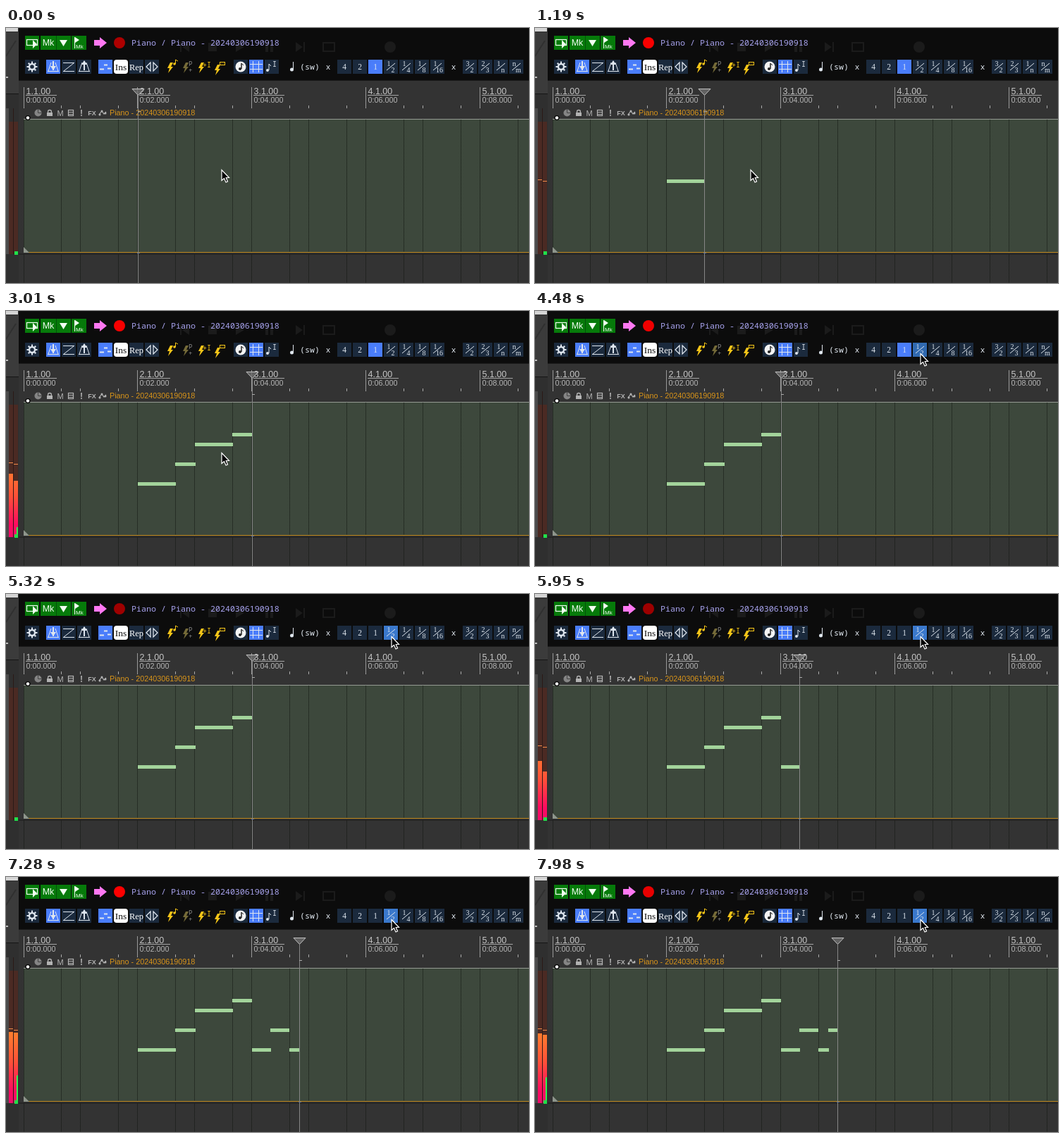
These frames come from a looping animation (742 px wide and 362 px high, 8 s). An HTML page with a canvas:

```html
<!DOCTYPE html>
<html>
<head>
<meta charset="utf-8">
<style>
html, body { margin: 0; width: 100%; height: 100%; overflow: hidden; background: #0c0c0c; }
canvas { display: block; }
</style>
</head>
<body>
<canvas id="stage" width="742" height="362"></canvas>
<script>
const c = document.getElementById('stage').getContext('2d');
const LOOP = 8000, STEP = 70, CLICK = 4900;
const SANS = '"Liberation Sans", sans-serif', MONO = '"Noto Sans Mono", monospace', SERIF = '"Liberation Serif", serif';
const NAVY = '#1b2a3d', BLUE = '#4a7dfb', PALE = '#dfe6ee', GOLD = '#f5c518';

// start x, end x, semitone, time of key press
const notes = [
  [187, 241, 0, 700], [240, 269, 2, 1540], [268, 322, 4, 2240], [321, 349, 5, 2850],
  [349, 376, 0, 5740], [375, 402, 2, 6450], [402, 417, 0, 7210], [416, 429, 2, 7900]
];

function rect(x, y, w, h, fill) { c.fillStyle = fill; c.fillRect(x, y, w, h); }

function path(pts, close) {
  c.beginPath();
  for (let i = 0; i < pts.length; i += 2) c.lineTo(pts[i], pts[i + 1]);
  if (close) c.closePath();
}
function line(pts, color, w = 1) {
  path(pts);
  c.strokeStyle = color; c.lineWidth = w; c.stroke();
}
function poly(pts, fill, edge, w = 1) {
  path(pts, true);
  if (fill) { c.fillStyle = fill; c.fill(); }
  if (edge) { c.strokeStyle = edge; c.lineWidth = w; c.stroke(); }
}
function disc(x, y, r, fill) {
  c.beginPath(); c.arc(x, y, r, 0, 7);
  c.fillStyle = fill; c.fill();
}
function ring(x, y, r, color, w = 1) {
  c.beginPath(); c.arc(x, y, r, 0, 7);
  c.strokeStyle = color; c.lineWidth = w; c.stroke();
}
function text(s, x, y, font, color, align = 'left') {
  c.font = font; c.fillStyle = color; c.textAlign = align;
  c.fillText(s, x, y);
}
function button(x, fill = NAVY, y = 45) { rect(x, y, 20, 20, fill); }

function fraction(x, a, b, fill) {
  button(x, fill);
  text(a, x + 7, 54, '10px ' + SERIF, PALE, 'center');
  text(b, x + 13, 63, '10px ' + SERIF, PALE, 'center');
  line([x + 4, 60, x + 16, 50], PALE);
}

function bolt(x, y, color) {
  poly([x + 4, y, x, y + 8, x + 3, y + 8, x + 1, y + 15, x + 8, y + 6, x + 5, y + 6, x + 8, y], color);
}

function ghosts() {
  const g = '#1b1b1b';
  rect(247, 20, 2, 14, g); poly([260, 20, 250, 27, 260, 34], g);
  rect(287, 21, 12, 12, g);
  poly([326, 20, 338, 27, 326, 34], g);
  rect(368, 20, 4, 14, g); rect(375, 20, 4, 14, g);
  poly([411, 20, 421, 27, 411, 34], g); rect(422, 20, 2, 14, g);
  c.strokeStyle = g; c.lineWidth = 2; c.strokeRect(450, 21, 16, 12);
  disc(545, 27, 8, g);
}

function titleRow(t) {
  const green = '#067a0a', w = '#f2fff2';
  button(27, green, 11); rect(49, 11, 43, 20, green); rect(93, 11, 21, 20, green);
  rect(71, 11, 1, 20, '#04500a');
  c.strokeStyle = w; c.lineWidth = 1.2; c.strokeRect(29.5, 16.5, 15, 8);
  poly([38, 17, 44, 23, 38, 29], w);
  text('Mk', 60, 25, '12.5px ' + SANS, w, 'center');
  poly([76, 17, 87, 17, 81.5, 26], w);
  line([97.5, 13, 97.5, 29], w); poly([98, 13, 104, 17, 98, 21], w);
  text('Mk', 99, 29, '8px ' + SANS, w);
  poly([125, 17, 133, 17, 133, 13, 143, 21, 133, 29, 133, 25, 125, 25], '#ff78f2');
  const pulse = Math.cos((t - 175) / 550 * 2 * Math.PI) * 1.6;
  disc(161, 21, 8, `rgb(${205 + 48 * Math.max(-1, Math.min(1, pulse))},0,0)`);
  text('Piano / Piano - 20240306190918', 178, 25, '11.67px ' + MONO, '#a8a3ee');
}

function toolRow(t) {
  button(27);
  ring(37, 55, 4, PALE, 2.4);
  for (let a = 0; a < 8; a++) {
    const dx = Math.cos(a * Math.PI / 4), dy = Math.sin(a * Math.PI / 4);
    line([37 + dx * 5, 55 + dy * 5, 37 + dx * 7.5, 55 + dy * 7.5], PALE, 2);
  }
  [57, 79, 101].forEach((x, i) => {
    button(x, i ? NAVY : BLUE);
    if (i == 1) {
      line([81, 49.5, 97, 49.5], PALE); line([81, 61.5, 97, 61.5], PALE); line([82, 61, 96, 50], PALE);
    } else {
      line([x + 2, 61.5, x + 18, 61.5], PALE);
      line([x + 7, 49, x + 3, 61], PALE); line([x + 13, 49, x + 17, 61], PALE);
      line([x + 10, 47, x + 10, 60], PALE, 2);
      poly(i ? [x + 6, 52, x + 10, 46, x + 14, 52] : [x + 6, 54, x + 10, 60, x + 14, 54], PALE);
    }
  });
  button(131, BLUE);
  line([133, 58.5, 139, 58.5], PALE, 2); line([139, 52.5, 144, 52.5], PALE, 2); line([144, 57.5, 149, 57.5], PALE, 2);
  c.fillStyle = '#fff'; c.beginPath(); c.roundRect(153, 45, 20, 20, 4); c.fill();
  text('Ins', 163, 60, '13.5px ' + SERIF, '#111', 'center');
  button(175);
  text('Rep', 185, 60, '12.5px ' + SERIF, '#fff', 'center');
  button(197);
  poly([205, 49, 199, 55, 205, 61], null, PALE, 1.3);
  poly([209, 49, 215, 55, 209, 61], null, PALE, 1.3);

  bolt(229, 49, GOLD);
  disc(239, 51, 1.8, GOLD); line([240.5, 51, 240.5, 45, 244, 47], GOLD);
  bolt(251, 49, '#746a38'); text('P', 259, 54, '9px ' + MONO, '#8a8a8a'); text('+', 259, 63, '9px ' + MONO, '#8a8a8a');
  bolt(273, 49, GOLD); text('+I', 279, 56, '10px ' + MONO, GOLD);
  bolt(296, 52, GOLD); c.strokeStyle = GOLD; c.lineWidth = 1; c.strokeRect(303.5, 48.5, 7, 4);

  button(323);
  disc(333, 55, 7.5, '#f4f4f4');
  line([334, 50, 334, 58], '#222', 1.5); disc(332, 58, 2, '#222'); line([334, 50, 337, 53], '#222');
  button(345, BLUE);
  line([346, 51.5, 364, 51.5], PALE); line([346, 58.5, 364, 58.5], PALE);
  line([350.5, 47, 350.5, 63], PALE); line([358.5, 47, 358.5, 63], PALE);
  button(367);
  disc(371, 60, 2, PALE); line([373, 60, 373, 51, 376, 54], PALE); text('I', 378, 55, '10px ' + MONO, PALE);

  disc(405.5, 59, 2.5, PALE); line([407.5, 59, 407.5, 48], PALE);
  text('(sw)', 417, 59, '11.67px ' + MONO, PALE);
  text('x', 457, 59, '11px ' + MONO, PALE, 'center');
  text('x', 635, 59, '11px ' + MONO, PALE, 'center');
  const clicked = t >= CLICK;
  ['4', '2', '1'].forEach((s, i) => {
    button(470 + i * 22, i == 2 && !clicked ? BLUE : NAVY);
    text(s, 480 + i * 22, 59, '11.5px ' + SERIF, PALE, 'center');
  });
  fraction(536, '1', '2', clicked ? '#3a78cc' : t >= 4270 ? '#3069b0' : NAVY);
  fraction(558, '1', '4'); fraction(580, '1', '8'); fraction(602, '1', '16');
  fraction(648, '3', '2'); fraction(670, '2', '3'); fraction(692, '1', 'n'); fraction(714, 'n', 'm');
}

function arrange() {
  rect(18, 75, 724, 287, '#333');
  rect(18, 74, 724, 1, '#1a1a1a');
  rect(25, 130, 717, 189, '#3d483c');
  for (let k = 0; k < 9; k++) {
    for (const dx of [0, 53.9]) {
      const x = Math.floor(25 + k * 80.9 + dx);
      c.setLineDash([1, 1]);
      line([x + .5, 130, x + .5, 362], '#10140f');
      c.setLineDash([]);
      rect(x, 110, 1, 4, '#aaa');
    }
  }
  for (let bar = 0; bar < 5; bar++) {
    const x = Math.floor(25 + bar * 161.8);
    rect(x, 84, 1, 29, '#999');
    text(`${bar + 1}.1.00`, x + 3.5, 94, '12.5px ' + SANS, '#c4c4c4');
    rect(x + 3, 95, 44, 1, '#a5a5a5');
    text(`0:0${bar * 2}.000`, x + 3.5, 106, '10.8px ' + SANS, '#b4b4b4');
  }
  rect(25, 129, 717, 1, '#959b93');
  rect(25, 318, 717, 1, '#bd871c');
  rect(18, 320, 724, 2, '#262626');
  poly([25, 311, 33, 319, 25, 319], '#8f968c');
}

function itemLabel() {
  const g = '#b3b3b3';
  disc(45.5, 120.5, 5, '#858585'); line([45.5, 115.5, 45.5, 120.5, 50, 120.5], '#444');
  rect(58, 120, 8, 5, g); ring(62, 119, 2.5, g, 1.3);
  text('M', 77, 124.5, '11px ' + SANS, g, 'center');
  c.strokeStyle = g; c.lineWidth = 1.2; c.strokeRect(88.5, 116.5, 7, 8);
  line([88, 119.5, 96, 119.5], g); line([88, 122.5, 96, 122.5], g);
  text('!', 107, 125, 'bold 12px ' + SANS, g, 'center');
  text('FX', 122, 124, 'bold 9px ' + SANS, g, 'center');
  line([132, 123, 136, 118, 139, 122, 142, 119], g, 1.2);
  disc(133, 123, 1.5, g); disc(136, 118, 1.5, g); disc(141, 121, 1.5, g);
  text('Piano - 20240306190918', 147, 124, '10.8px ' + SANS, '#d8941a');
  disc(31, 127.5, 3.5, '#000'); disc(31, 127.5, 2.3, '#fff');
}

function meters(age) {
  rect(0, 0, 18, 362, '#2f2f2f');
  rect(0, 6, 18, 88, '#3b3b3b');
  rect(0, 0, 17, 5, '#d4d4d4');
  line([0, 40, 14, 18], '#303030', 2);
  rect(0, 69, 3, 2, '#bbb');
  rect(0, 93, 18, 1, '#151515');
  rect(0, 114, 4, 207, '#4b4b4b');
  rect(4, 133, 6, 188, '#4b2a23'); rect(11, 133, 6, 188, '#4b2a23');
  rect(10, 114, 1, 207, '#2a1a17');
  if (age < 570) {
    const fall = Math.max(0, age - 260) * .9;
    const glow = c.createLinearGradient(0, 205, 0, 321);
    glow.addColorStop(0, '#ff8f2a'); glow.addColorStop(.5, '#ff5038'); glow.addColorStop(.85, '#ff0a60'); glow.addColorStop(1, '#f00a6a');
    [[4, 212, .12, 215], [11, 206, .22, 217]].forEach(([x, top, rate, peak]) => {
      const y = Math.min(321, Math.round(top + age * rate + fall));
      rect(x, y, 6, 321 - y, glow);
      rect(x, peak, 6, 1, '#f08a4a');
    });
    const y = Math.min(317, 262 + age * .28);
    rect(15, y, 2, 321 - y, '#2cff50');
  }
  rect(12, 317, 5, 5, '#1fe04a');
}

function playhead(x) {
  rect(x, 96, 1, 266, '#868686');
  rect(x, 118, 4, 1, '#aaa');
  rect(x - 1, 319, 4, 1, '#58709a');
  poly([x - 8, 86.5, x + 9, 86.5, x + .5, 95.5], 'rgba(110,110,110,.8)', '#c0c0c0');
}

function mouse(t) {
  const p = Math.max(0, Math.min(1, (t - 3500) / 770)), e = p * p * (3 - 2 * p);
  c.save();
  c.translate(306 + 241 * e, 201.5 - 141 * e);
  poly([0, 0, 0, 15, 3.5, 12, 6, 17.5, 8.5, 16.4, 6.2, 11, 10.5, 11], '#000', '#fff', 1.2);
  c.restore();
}

function draw(now) {
  const t = Math.floor(now % LOOP / STEP) * STEP;
  const played = notes.filter(n => t >= n[3]);
  const last = played[played.length - 1];
  const base = played.length > 2 ? 243 : played.length == 2 ? 229 : 215;
  rect(0, 0, 742, 362, '#0c0c0c');
  ghosts();
  titleRow(t);
  toolRow(t);
  arrange();
  itemLabel();
  for (const [a, b, pitch] of played) rect(a, base - pitch * 14, b - a, 5, '#a3d49b');
  meters(last ? t - last[3] : 1e4);
  playhead(last ? [240, 268, 321, 349, 375, 402, 416, 429][played.length - 1] : 187);
  mouse(t);
  requestAnimationFrame(tick);
}
const start = performance.now();
function tick() { draw(performance.now() - start); }
tick();
</script>
</body>
</html>
```
